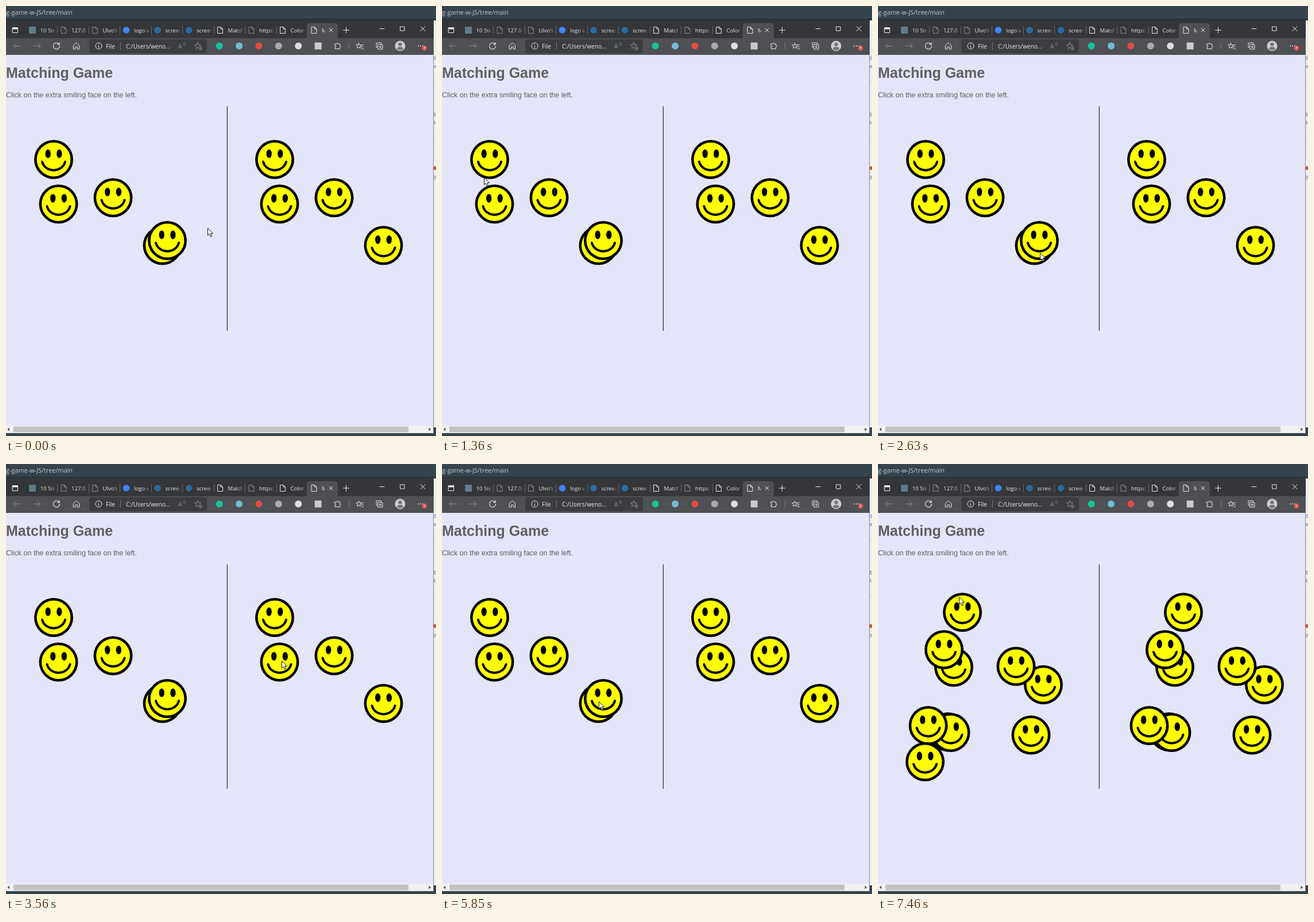
Animation, 749 px wide and 748 px high, one loop 7.99 s. Source, as an HTML page with a canvas:

```html
<!DOCTYPE html>
<html lang="en">
<head>
<meta charset="utf-8">
<title>Matching Game</title>
<style>
html, body { margin: 0; width: 100%; height: 100%; overflow: hidden; background: #e5e5f9; }
canvas { display: block; }
</style>
</head>
<body>
<canvas id="stage" width="749" height="748"></canvas>
<script>
const canvas = document.getElementById('stage');
const ctx = canvas.getContext('2d');
const LOOP = 7990, SWAP = 6120, FIRST = 160, BEAT = 130;
const HALF = 385, TAB = 54.5;
const UI = '"Open Sans", "Noto Sans", sans-serif';
const ARIAL = '"Liberation Sans", Arial, sans-serif';
const LIGHT = '#e8e8e8', DIM = '#8c8e91', BAR = '#4e5054', FIELD = '#3b3d40';

// Turning points of the pointer: beat, x, y.
const route = [
  [0, 351, 386], [2, 402, 318], [4, 273, 275], [5, 285, 319],
  [9, 68, 257], [10, 73, 298], [13, 154, 364], [15, 214, 340],
  [20, 282, 429], [23, 446, 301], [24, 433, 273], [26, 462, 338],
  [29, 515, 349], [31, 549, 341], [34, 645, 426], [37, 645, 426],
  [40, 299, 427], [42, 254, 441], [44, 273, 413], [49, 273, 413],
  [51, 283, 430], [53, 192, 416], [55, 144, 340], [57, 141, 231]
];

// Faces in stacking order; the last one is missing on the right.
const rounds = [
  [[83, 267], [186.5, 333.5], [91.5, 344.5], [272.5, 416.5], [281, 408]],
  [[147, 258], [132, 353.5], [115, 323], [288, 384], [240.5, 352],
   [121.5, 466], [126.5, 467], [87.5, 455], [266.5, 471.5], [82, 518]]
];

const tabs = [
  ['10 Steps', '#607d8b'], ['127.0.0.1', DIM], ['Ulvo\u2019s page', DIM],
  ['logo work', '#4285f4'], ['screen to', '#2b6a9e'], ['screen to', '#2b6a9e'],
  ['Matching', LIGHT], ['https://', DIM], ['Color', LIGHT], ['Matching', LIGHT]
];
const extensions = ['#15c39a', '#76bbd5', '#e24b43', '#a9abad', '#dedede', '#c9cacc'];

function rect(x, y, w, h, color) {
  ctx.fillStyle = color;
  ctx.fillRect(x, y, w, h);
}

function box(x, y, w, h, r, color) {
  ctx.beginPath();
  ctx.roundRect(x, y, w, h, r);
  ctx.fillStyle = color;
  ctx.fill();
}

function oval(x, y, rx, ry, color) {
  ctx.beginPath();
  ctx.ellipse(x, y, rx, ry, 0, 0, Math.PI * 2);
  ctx.fillStyle = color;
  ctx.fill();
}

const disc = (x, y, r, color) => oval(x, y, r, r, color);

function text(str, x, y, size, color, family = UI, weight = 400) {
  ctx.font = `${weight} ${size}px ${family}`;
  ctx.fillStyle = color;
  ctx.fillText(str, x, y);
}

// Outline icon centred on x, y.
function icon(x, y, path, color = LIGHT, width = 1) {
  ctx.save();
  ctx.translate(x, y);
  ctx.strokeStyle = color;
  ctx.lineWidth = width;
  ctx.lineJoin = ctx.lineCap = 'round';
  ctx.stroke(new Path2D(path));
  ctx.restore();
}

const square = r => `M${-r} ${-r}H${r}V${r}H${-r}Z`;
const cross = r => `M${-r} ${-r}L${r} ${r}M${r} ${-r}L${-r} ${r}`;
const plus = r => `M${-r} 0H${r}M0 ${-r}V${r}`;
const ring = r => `M${r} 0A${r} ${r} 0 1 1 ${-r} 0A${r} ${r} 0 1 1 ${r} 0`;
const arrow = dir => `M${-6 * dir} 0H${6 * dir}M${dir} -5L${6 * dir} 0L${dir} 5`;

function star(r) {
  const points = Array.from({ length: 10 }, (_, i) => {
    const a = i * Math.PI / 5, d = i % 2 ? r * 0.45 : r;
    return `${d * Math.sin(a)} ${-d * Math.cos(a)}`;
  });
  return `M${points.join('L')}Z`;
}

function fileIcon(x, y, color) {
  icon(x, y, 'M-4 -5.5H1L4.5 -2V5.5H-4ZM1 -5.5V-2H4.5', color);
}

function drawTab([label, color], i) {
  const x = 46 + i * TAB, left = x + 13.5;
  const room = i === tabs.length - 1 ? 6 : 25;
  if (color === LIGHT || color === DIM) fileIcon(x, 42, color);
  else if (i === 0) rect(x - 6, 36, 12, 12, color);
  else disc(x, 42, 5.8, color);

  const fade = ctx.createLinearGradient(left, 0, left + room, 0);
  fade.addColorStop(0.6, '#e8e8e8');
  fade.addColorStop(1, '#85878a');
  ctx.save();
  ctx.beginPath();
  ctx.rect(left, 30, room, 24);
  ctx.clip();
  text(label, left, 45.5, 9.6, fade);
  ctx.restore();
  if (i < 8) rect(Math.round(x + 43), 35, 1, 14, '#65676a');
}

function tabStrip() {
  rect(0, 25, 745, 32, '#343639');
  box(524, 30, 54, 28, [5, 5, 0, 0], BAR);
  icon(16, 42, square(4.5));
  rect(11.5, 37.5, 9.5, 3, LIGHT);
  tabs.forEach(drawTab);
  icon(566, 42, cross(3));
  icon(592.5, 42, plus(5));
  icon(655, 39.5, 'M-4 0H4');
  icon(690.5, 39.5, square(3.5));
  icon(726, 39.5, cross(4));
}

function toolbar() {
  const y = 69.5;
  rect(0, 56, 745, 29, BAR);
  icon(19, y, arrow(-1), DIM);
  icon(54, y, arrow(1), DIM);
  icon(88, y, 'M4.6 -3A5.5 5.5 0 1 0 5.5 0M5 -6V-2.6H1.5', LIGHT, 1.2);
  icon(122.5, y, 'M-5 -1L0 -5.5L5 -1V5.5H1.7V1.5H-1.7V5.5H-5Z');

  box(145, 58, 205, 24, 4, FIELD);
  icon(161.5, y, ring(5.5) + 'M0 -0.5V3M0 -2.8V-2.7');
  text('File', 174, 73.5, 10.1, LIGHT);
  text('C:/Users/weno...', 209, 73.5, 10.1, LIGHT);
  text('A', 300, 74, 10.5, DIM);
  icon(309, 66.5, 'M0 -2Q2 0 0 2M2.5 -3Q5 0 2.5 3', DIM, 0.8);
  icon(334, y, star(5.8), DIM);
  disc(338.5, 73.5, 3.7, FIELD);
  icon(338.5, 73.5, ring(3) + plus(1.7), DIM, 0.8);

  extensions.forEach((color, i) => {
    const x = 371.7 + i * 34.4;
    if (i < 5) disc(x, y, 6, color);
    else rect(x - 6, y - 6, 12, 12, color);
  });
  icon(578, y, 'M-5 -3.5H-2A1.5 1.5 0 0 1 1 -3.5H3.5V-1A1.5 1.5 0 0 1 3.5 2V5H-5V2A1.5 1.5 0 0 0 -5 -1Z');
  [199, 597].forEach(x => rect(x, 63, 1, 13, '#74767a'));
  icon(614.5, y, star(5));
  icon(619.5, y, 'M0 -2H3M-1 1.5H3M0 5H3');
  icon(649.5, 68, square(4));
  box(647.5, 66.5, 9, 9, 1, BAR);
  icon(652, 71, square(4) + plus(2));

  disc(686.5, y, 9, '#cfcfcf');
  disc(686.5, y - 2.7, 3.3, '#77797b');
  oval(686.5, y + 4.5, 5.6, 2.9, '#77797b');
  [718, 722, 726].forEach(x => disc(x, y, 1, LIGHT));
  disc(729, 73, 4.5, '#d9534f');
  text('?', 727.2, 75.8, 7, '#ffffff', UI, 600);
}

function backdrop() {
  rect(0, 0, 749, 748, '#35434c');
  rect(0, 22, 749, 3, '#2a343b');
  text('g-game-w-JS/tree/main', 0, 14.5, 10.9, '#c3c8cb');
  rect(745, 25, 4, 708, '#ececef');
  rect(744, 25, 1, 719, '#8b8d91');
  [131, 229].forEach(y => rect(745, y, 4, 1, '#cfcfd3'));
  text('li', 745, 94, 9, '#3c74c4');
  text('e', 745, 108, 9, '#3c74c4');
  text('b', 745, 192, 9, '#55575a');
  text('t', 745, 206, 9, '#55575a');
  rect(745, 279, 4, 6, '#d4512a');
  text('y', 745, 300, 9, '#6a6c70');
}

function triangle(x, y, dir) {
  ctx.beginPath();
  ctx.moveTo(x + 2 * dir, y);
  ctx.lineTo(x - 1.5 * dir, y - 3);
  ctx.lineTo(x - 1.5 * dir, y + 3);
  ctx.fillStyle = '#505050';
  ctx.fill();
}

function page() {
  rect(0, 85, 744, 645, '#e5e5f9');
  text('Matching Game', 0, 125, 25, '#606063', ARIAL, 700);
  text('Click on the extra smiling face on the left.', 0, 159, 12.5, '#606063', ARIAL);
  rect(HALF - 0.2, 174.5, 1, 390.5, '#000000');
  rect(0, 730, 744, 13, '#f1f1f1');
  rect(13, 731.5, 688, 10, '#c1c1c1');
  triangle(4.5, 736.5, -1);
  triangle(738, 736.5, 1);
}

function face(x, y) {
  disc(x, y, 34, '#000000');
  disc(x, y, 29.4, '#ffff00');
  [-9.8, 9.8].forEach(dx => oval(x + dx, y - 10, 4.7, 7.4, '#000000'));
  icon(x, y, 'M-20 4C-15 23.5 15 23.5 20 4', '#000000', 4);
}

function faces(list) {
  list.forEach(([x, y]) => face(x, y));
  list.slice(0, -1).forEach(([x, y]) => face(x + HALF, y));
}

// The pointer glides between turning points but is only seen once per beat.
function pointerAt(t) {
  const beat = Math.max(0, Math.floor((t - FIRST) / BEAT) + 1);
  const next = route.findIndex(p => p[0] > beat);
  if (next < 0) return route.at(-1).slice(1);
  const [b0, x0, y0] = route[next - 1], [b1, x1, y1] = route[next];
  const k = (beat - b0) / (b1 - b0);
  return [x0 + (x1 - x0) * k, y0 + (y1 - y0) * k].map(Math.round);
}

const pointerShape = new Path2D('M0.5 0.5V13L3.4 10.4L5.5 15.2L7.6 14.3L5.6 9.6H9.4Z');

function pointer(t) {
  ctx.save();
  ctx.translate(...pointerAt(t));
  ctx.fillStyle = '#ffffff';
  ctx.fill(pointerShape);
  ctx.strokeStyle = '#000000';
  ctx.lineWidth = 0.9;
  ctx.stroke(pointerShape);
  ctx.restore();
}

function draw(t) {
  backdrop();
  tabStrip();
  toolbar();
  page();
  faces(rounds[t < SWAP ? 0 : 1]);
  pointer(t);
}

const begin = performance.now();
function tick() {
  draw((performance.now() - begin) % LOOP);
  requestAnimationFrame(tick);
}
tick();
</script>
</body>
</html>
```
